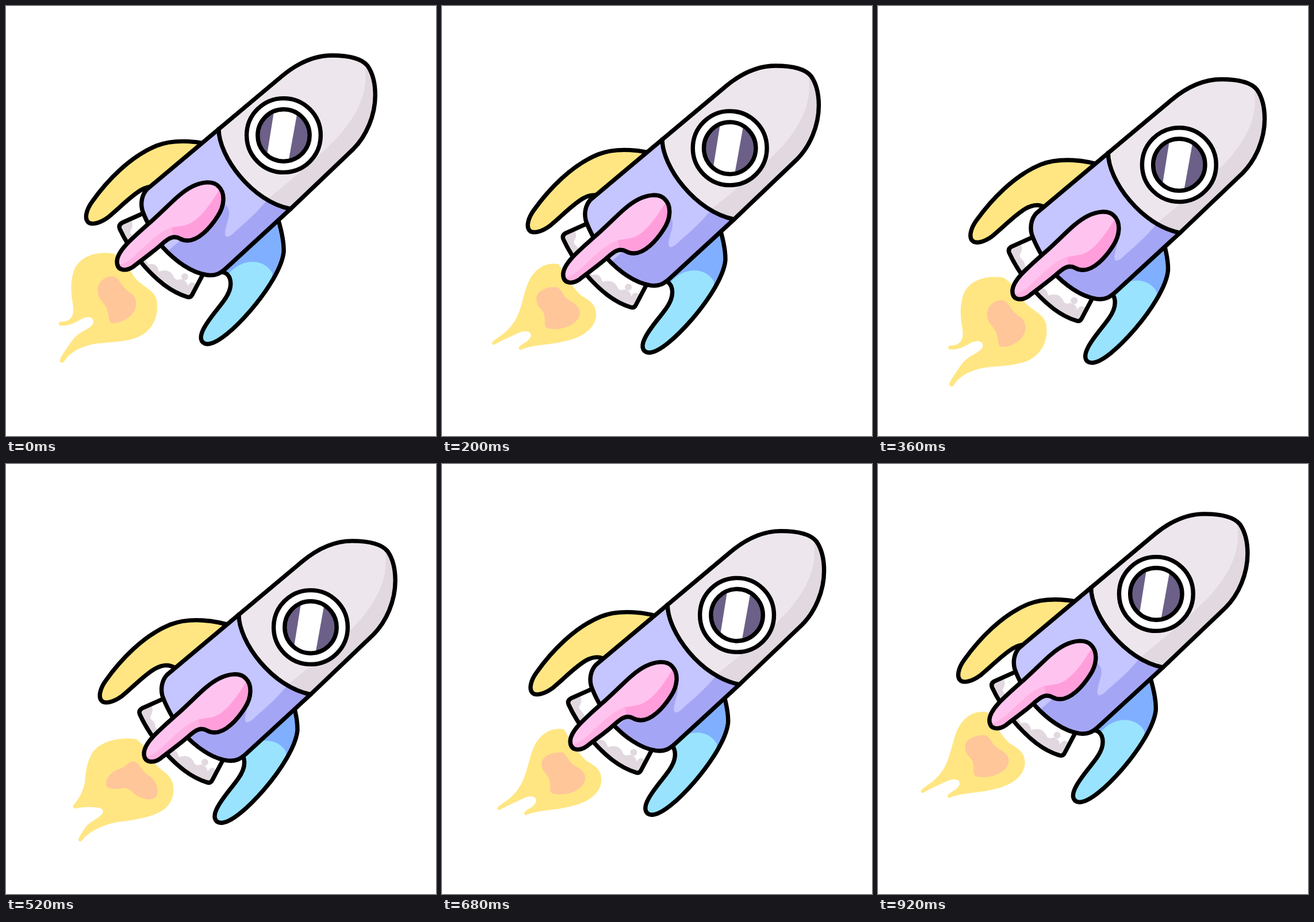
Write an HTML page that moves like this. It is 748 px wide and 748 px high and loops after 0.96 s.

```html
<!DOCTYPE html>
<html lang="en">
<head>
<meta charset="utf-8">
<title>Rocket</title>
<style>
  html, body { margin: 0; width: 100%; height: 100%; overflow: hidden; background: #fff; }
  svg { display: block; width: 100%; height: 100%; }
  .ink { fill: none; stroke: #000; stroke-width: 7.4; stroke-linejoin: round; stroke-linecap: round; }
  .flame { fill: #ffe682; }
  .flame .core { fill: #ffc69a; }
</style>
</head>
<body>
<svg viewBox="0 0 748 748">
  <defs>
    <path id="hull" d="M480 122C510 97 540 86 567 86C600 86 620 93 629 104C638 117 642.3 136 642.3 155C642.3 190 627 226 604 249L495 353L383 456C373 465 365 470 350 468C322 464 294 443 273 420C256 398 242 370 237 355C234 343 236 329 245 319Z"/>
    <path id="finA" d="M375 247C340 235 295 230 262 243C215 262 175 305 150 340C139 355 137 369 142 375C148 382 163 378 177 368C198 351 215 332 235 320C247 313 258 311 270 318L285 330Z"/>
    <path id="finB" d="M470 360C478 385 484 408 483 428C480 455 455 495 425 530C398 561 368 588 350 588C338 587 336 576 344 561C352 545 368 528 380 511C390 497 393 484 389 473C385 464 378 461 366 464Z"/>
    <path id="finC" d="M193 444C194 426 215 408 250 377C280 351 300 326 324 314C340 306 360 303 370 314C382 326 380 348 368 366C354 388 334 408 316 408C302 408 304 402 293 402C283 402 273 413 262 422C250 432 232 445 222 453C211 461 193 463 193 444Z"/>
    <path id="nozzle" d="M240 360L202 377Q195 381 198 388C215 425 245 462 275 485C287 494 302 502 315 506Q321 508 324 502L343 466Z"/>
    <clipPath id="inHull"><use href="#hull"/></clipPath>
    <clipPath id="inFinB"><use href="#finB"/></clipPath>
    <clipPath id="inFinC"><use href="#finC"/></clipPath>
    <clipPath id="inNozzle"><use href="#nozzle"/></clipPath>
    <clipPath id="inGlass"><circle cx="483" cy="225" r="45.2"/></clipPath>
  </defs>

  <g class="ship">
    <g class="flame">
      <path d="M188 431C160 426 130 434 119 458C110 482 114 505 117 523C119 541 110 550 96 549C90 550 90 556 97 556C112 556 122 550 132 544C142 539 153 541 152 550C150 562 128 564 115 582C106 595 97 607 94 615C93 620 97 622 101 619C110 603 130 591 160 587C190 584 220 584 240 570C260 556 266 532 262 511C257 492 235 488 222 470Q210 445 188 431Z"/>
      <path class="core" d="M178 471C164 475 157 488 160 501C163 513 172 517 175 526C179 537 178 546 182 551C192 554 211 547 221 534C229 522 228 508 218 500C206 492 203 487 197 478C192 470 185 469 178 471Z"/>
    </g>
    <g class="flame">
      <path d="M192 431C165 426 128 434 115 455C104 474 104 492 102 507C98 526 90 537 82 546C81 550 83 552 87 551C100 549 112 548 124 550C134 551 136 556 132 561C125 570 113 573 105 582C98 592 93 599 91 606C92 610 96 610 98 606C110 592 132 580 160 575C190 571 220 567 240 553C256 540 259 522 255 507C250 490 232 485 222 470Q210 445 192 431Z"/>
      <path class="core" d="M183 470C174 475 171 480 162 483C148 487 139 498 139 510C141 519 155 518 168 516C180 515 185 524 193 529C205 537 221 538 227 530C232 518 226 504 216 496C204 488 200 482 196 475Q190 468 183 470Z"/>
    </g>
    <g class="flame">
      <path d="M190 431C165 426 145 442 136 465C126 490 125 518 106 540C96 552 83 559 75 566C72 570 76 573 80 570C93 563 110 555 124 549C138 545 143 551 141 557C138 566 128 568 122 574C118 579 123 582 128 578C150 571 180 571 205 564C235 557 254 540 255 520C255 500 243 494 228 485Q212 470 190 431Z"/>
      <path class="core" d="M182 471C168 471 151 478 151 491C151 507 163 508 165 521C167 532 163 541 172 543C190 547 214 540 223 527C231 514 226 504 212 496C200 490 198 483 193 476Q189 470 182 471Z"/>
    </g>
    <g clip-path="url(#inNozzle)">
      <use href="#nozzle" fill="#e1d8e0"/>
      <path fill="#fff" d="M213 364C222 376 221 384 217 390C213 398 225 398 225 409L248 450Q262 445 266 462Q283 456 291 469Q294 479 304 475Q315 477 316 487Q322 477 329 483L340 486L350 455L250 350Z"/>
      <circle cx="311" cy="471" r="6" fill="#e1d8e0"/>
    </g>
    <use href="#nozzle" class="ink"/>
  </g>

  <g class="fins">
    <use href="#finA" fill="#ffe682"/>
    <use href="#finA" class="ink"/>
    <g clip-path="url(#inFinB)">
      <use href="#finB" fill="#81afff"/>
      <path fill="#99e3ff" d="M380 478C398 440 446 434 463 464Q464 474 461 500L400 610H320V560Z"/>
    </g>
    <use href="#finB" class="ink"/>
  </g>

  <g class="ship">
    <g clip-path="url(#inHull)">
      <use href="#hull" fill="#c5c5ff"/>
      <path fill="#a5a5f5" d="M454 338C434 362 416 377 400 391C390 402 380 406 381 394C383 378 391 364 387 354C384 345 378 343 372 348L282 426L330 500L420 460L520 350Z"/>
      <path fill="#eee6ed" d="M370 214C370 262 428 340 495 353L680 200V60H480Z"/>
      <path fill="#e1d8e0" d="M622 90C633 140 619 180 578 227C546 261 500 300 455 336Q474 348 495 353L680 200V60Z"/>
    </g>
    <path class="ink" d="M370 214C370 262 428 340 495 353"/>
    <use href="#hull" class="ink"/>
  </g>

  <g class="front">
    <circle cx="483" cy="225" r="64.4" fill="#fff"/>
    <circle cx="483" cy="225" r="64.4" class="ink"/>
    <g clip-path="url(#inGlass)">
      <circle cx="483" cy="225" r="45.2" fill="#6c6088"/>
      <path fill="#fff" d="M467 178H508L491 272H452Z"/>
    </g>
    <circle cx="483" cy="225" r="45.2" class="ink"/>
    <g clip-path="url(#inFinC)">
      <use href="#finC" fill="#ffc3ef"/>
      <path fill="#ffb1e3" d="M190 452Q206 450 222 436C246 414 268 390 292 384L300 420L220 470H190Z"/>
      <path fill="#ff9edb" d="M376 312C354 347 338 371 316 380C306 384 298 382 288 386L296 420H400V330Z"/>
    </g>
    <use href="#finC" class="ink"/>
  </g>
</svg>
<script>
  const LOOP = 960, STEP = 40;
  const all = name => [...document.querySelectorAll('.' + name)];
  const flames = all('flame');
  const layers = [
    { parts: all('ship'), dx: 35.5, dy: 48.7, lead: 0 },
    { parts: all('fins'), dx: 24.5, dy: 37.3, lead: 10 },
    { parts: all('front'), dx: 47.8, dy: 60, lead: 0 }
  ];
  const sway = t => (1 - Math.cos(2 * Math.PI * t / LOOP)) / 2;

  function draw() {
    const step = Math.floor(performance.now() % LOOP / STEP);
    for (const { parts, dx, dy, lead } of layers) {
      const k = sway(step * STEP + lead);
      for (const p of parts) p.setAttribute('transform', `translate(${dx * k} ${dy * k})`);
    }
    flames.forEach((f, i) => f.style.display = i === step % 3 ? '' : 'none');
    requestAnimationFrame(draw);
  }
  draw();
</script>
</body>
</html>
```
